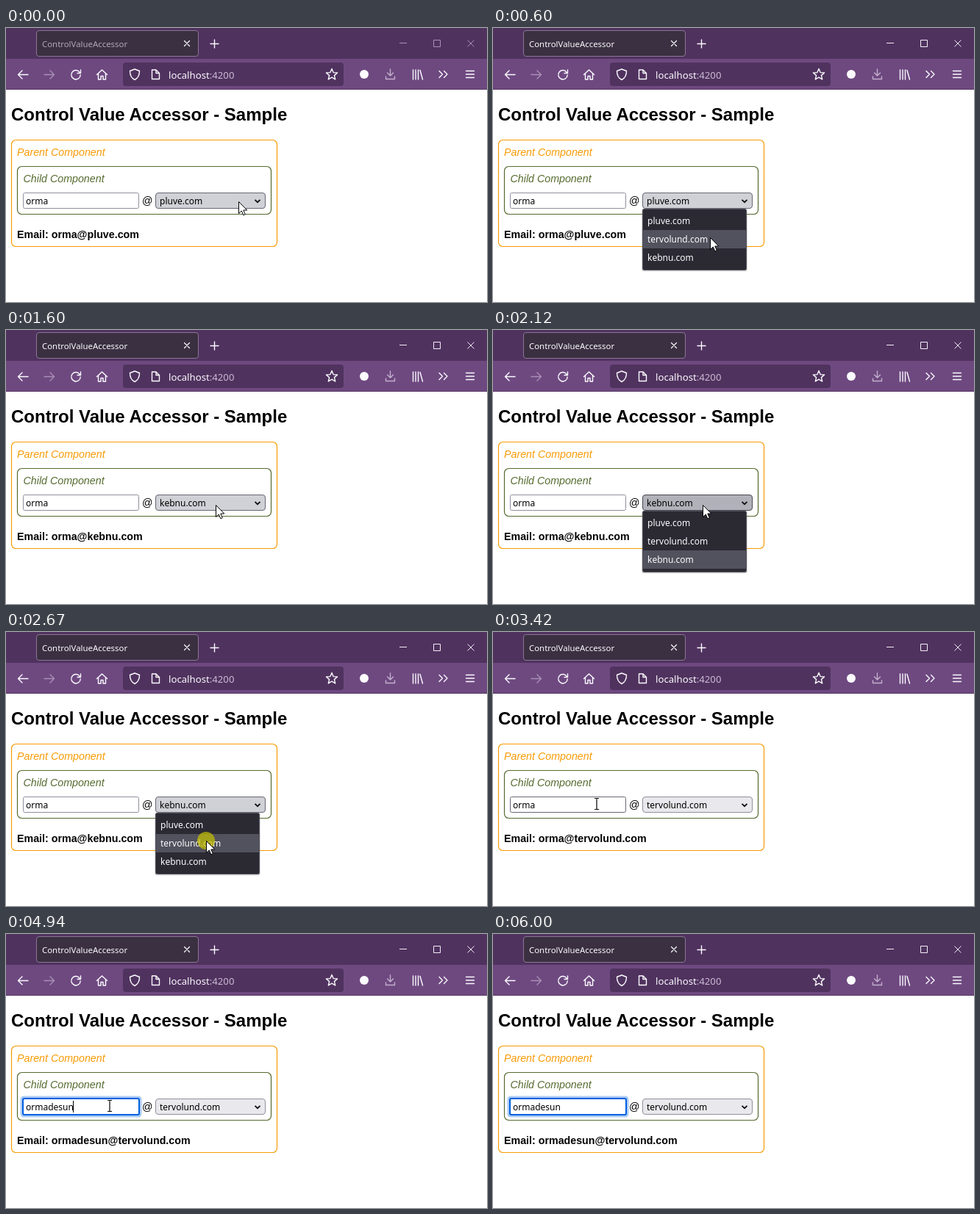
An HTML page that plays this animation: 654x373 px, repeating every 6.4 s.

```html
<!DOCTYPE html>
<html lang="en">
<head>
<meta charset="utf-8">
<title>Form demo</title>
<style>
  html, body { margin: 0; width: 100%; height: 100%; overflow: hidden; background: #fff; }
  svg { display: block; width: 654px; height: 373px; }
  text { white-space: pre; }
  .ui { font-family: "Noto Sans", "Open Sans", sans-serif; font-size: 12px; }
  .page { font-family: "Liberation Sans", Arial, sans-serif; font-size: 14.25px; }
  .icon { fill: none; stroke: #fbfbfe; stroke-width: 1.4; stroke-linecap: round; stroke-linejoin: round; }
  .dim { stroke: #a88fb5; }
</style>
</head>
<body>
<svg viewBox="0 0 654 373">
  <rect width="654" height="373" fill="#fff"/>

  <!-- browser window -->
  <rect width="654" height="42" fill="#50325f"/>
  <rect y="42" width="654" height="42" fill="#6e4980"/>
  <rect y="83" width="654" height="1" fill="#583a67"/>
  <rect x="41.5" y="3.5" width="220" height="35" rx="3.5" fill="#3b3041" stroke="#8b7697"/>
  <text id="tabTitle" class="ui" x="49" y="26" style="font-size:11.4px">ControlValueAccessor</text>
  <rect x="159" y="47" width="300" height="32" rx="4" fill="#50325f"/>
  <text class="ui" x="221" y="69" fill="#fbfbfe" style="font-size:13.2px">localhost<tspan fill="#c9bad2">:4200</tspan></text>
  <g class="icon">
    <path d="M242.5 17.5l7 7m0-7l-7 7" stroke-width="1.2"/>
    <path d="M278 21.5h11M283.5 16v11"/>
    <path d="M30 63.5H16.5m5.5-5.5l-5.5 5.5 5.5 5.500"/>
    <path class="dim" d="M52 63.500h13.500m-5.500-5.500l5.500 5.500-5.500 5.500"/>
    <path d="M100.300 60.500a6.200 6.200 0 1 0 .9 3.500M101.500 57v4.500H97"/>
    <path d="M123.500 63.500l7-6.500 7 6.500M125.500 62v8h3.500v-4.500h3V70h3.500v-8"/>
    <path d="M175 56l6.500 2.500c0 6-1.500 9.500-6.500 12-5-2.500-6.500-6-6.500-12z"/>
    <path d="M198.500 57h5.500l4.500 4.500v8h-10zM204 57v4.500h4.500"/>
    <path id="star"/>
    <path d="M522.500 56v9m-4-4l4 4 4-4M516.500 66v3.500h12V66" stroke="#c3afcd"/>
    <path d="M553.500 57v13M557 57v13M560.500 57v13M563 57.500l3.500 12.500"/>
    <path d="M589 58.500l4.500 4.500-4.500 4.500M595.500 58.500l4.500 4.500-4.500 4.500"/>
    <path d="M625.500 58.500h11M625.500 63h11M625.500 67.500h11"/>
  </g>
  <circle cx="487" cy="63" r="6" fill="#fbfbfe"/>
  <path id="winButtons" fill="none" d="M535 20.500h10M581.500 16.500h9v9h-9zM627.500 16.500l9 9m0-9l-9 9"/>

  <!-- page -->
  <g class="page">
    <text x="7" y="126" font-weight="bold" style="font-size:24px">Control Value Accessor - Sample</text>
    <rect x="7.500" y="152.500" width="361" height="145" rx="6" fill="none" stroke="#f89b06" stroke-width="1.200"/>
    <text x="15" y="174" font-style="italic" fill="#f89b06">Parent Component</text>
    <rect x="15.500" y="188.500" width="345" height="65" rx="6" fill="none" stroke="#556b2f" stroke-width="1.200"/>
    <text x="23.500" y="210" font-style="italic" fill="#556b2f">Child Component</text>
    <text x="185" y="240">@</text>
    <text id="email" x="15" y="286" font-weight="bold"></text>
  </g>

  <rect id="halo" x="19.500" y="220.500" width="165" height="29" rx="4.500" fill="#0060df" fill-opacity=".32"/>
  <rect id="field" rx="2" fill="#fff"/>
  <text id="user" class="ui" x="27" y="240"></text>
  <rect id="caret" y="227" width="1" height="16"/>

  <rect id="select" x="203.500" y="224.500" width="149" height="21" rx="3.500"/>
  <text id="domain" class="ui" x="209" y="240"></text>
  <path d="M338.500 233.800l3.500 3.400 3.500-3.400" fill="none" stroke="#111" stroke-width="1.800"/>

  <g id="list">
    <rect x="202" y="246" width="144" height="85.500" rx="3" fill="#000" opacity=".15"/>
    <rect x="203.500" y="246.500" width="141" height="83" rx="2" fill="#2b2a33" stroke="#55545e"/>
    <rect id="hover" x="204" width="140" height="25" fill="#52525e"/>
    <g id="options" class="ui" fill="#fbfbfe"></g>
  </g>

  <circle id="ring" r="12" fill="#c8c300" fill-opacity=".7"/>
  <g id="pointer">
    <path id="arrow" d="M.5 .5V16.500L4.300 13 6.800 18.800 9.300 17.700 6.800 12H11.800Z" fill="#fff" stroke="#000"/>
    <path id="beam" d="M-3 -7.500h2.500l.5.500.5-.500H3M0 -7V7M-3 7.500h2.500L0 7l.5.500H3" fill="none" stroke="#000" stroke-width="1.200"/>
  </g>
</svg>
<script>
const $ = id => document.getElementById(id);
const LOOP = 6400;
const ROW_TOP = 250, ROW_HEIGHT = 25;
const domains = ["pluve.com", "tervolund.com", "kebnu.com"];
const firstName = "orma", fullName = "ormadesun";
const keyTimes = [4350, 4480, 4610, 4740, 4940];

const linear = p => p;
const easeOut = p => 1 - (1 - p) ** 2.2;
const smooth = p => p * p * (3 - 2 * p);

const home = [316, 236];
const moves = [
  { start: 470, end: 920, steps: 8, to: [283, 312], ease: easeOut },
  { start: 1330, end: 1600, steps: 5, to: [285, 238], ease: smooth },
  { start: 2130, end: 2470, steps: 6, to: [272, 284], ease: easeOut },
  { start: 2940, end: 3420, steps: 8, to: [141, 234], ease: smooth },
  { start: 5730, end: 5930, steps: 4, to: [448, 343], ease: linear },
];

// each span is [from, until)
const presses = [[200, 270], [1120, 1190], [1930, 2000], [2670, 2740], [3620, 3680]];
const listOpen = [[270, 1190], [2000, 2740]];
const selectHeld = [[200, 470], [1930, 2130]];
const caretOn = [[3620, 4150], [4350, 5200], [5730, 6000]];

const within = (spans, t) => spans.some(([a, b]) => t >= a && t < b);
const inBox = ([x, y], left, top, right, bottom) => x >= left && x <= right && y >= top && y <= bottom;
const show = (id, on) => $(id).setAttribute("visibility", on ? "inherit" : "hidden");

function set(id, attrs) {
  for (const name in attrs) $(id).setAttribute(name, attrs[name]);
}

function setText(id, value) {
  if ($(id).textContent !== value) $(id).textContent = value;
}

function pointerAt(t) {
  let pos = home;
  for (const { start, end, steps, to, ease } of moves) {
    if (t < start) break;
    const step = Math.floor((t - start) / (end - start) * (steps - 1) + 0.01) + 1;
    const p = ease(Math.min(1, step / steps));
    pos = pos.map((v, i) => Math.round(v + (to[i] - v) * p));
  }
  return pos;
}

function render(t) {
  const pos = pointerAt(t);
  const open = within(listOpen, t);
  const chosen = t < 1190 ? 0 : t < 2740 ? 2 : 1;
  const user = fullName.slice(0, firstName.length + keyTimes.filter(k => t >= k).length);

  const active = t >= 200;
  set("tabTitle", { fill: active ? "#fbfbfe" : "#b0a6b5" });
  set("winButtons", { stroke: active ? "#f4eff7" : "#a994b5" });

  const overField = inBox(pos, 23, 224, 181, 246);
  const focused = t >= 3620;
  show("halo", focused);
  set("field", focused
    ? { x: 23, y: 224, width: 158, height: 22, stroke: "#0060df", "stroke-width": 2 }
    : { x: 23.5, y: 224.5, width: 157, height: 21, stroke: overField ? "#676774" : "#8f8f9d", "stroke-width": 1 });
  setText("user", user);
  setText("domain", domains[chosen]);
  setText("email", `Email: ${user}@${domains[chosen]}`);
  set("caret", { x: Math.floor(27 + $("user").getComputedTextLength()) });
  show("caret", within(caretOn, t));

  const [fill, stroke] = within(selectHeld, t) ? ["#b1b1b9", "#484851"]
    : open || inBox(pos, 203, 224, 353, 246) ? ["#d0d0d7", "#676774"]
    : ["#e9e9ed", "#8f8f9d"];
  set("select", { fill, stroke });

  const row = pos[1] < ROW_TOP ? chosen : Math.min(2, Math.floor((pos[1] - ROW_TOP) / ROW_HEIGHT));
  set("hover", { y: ROW_TOP + row * ROW_HEIGHT });
  show("list", open);

  set("ring", { cx: pos[0], cy: pos[1] });
  show("ring", within(presses, t));
  set("pointer", { transform: `translate(${pos})` });
  show("pointer", t < 6000);
  show("arrow", !overField);
  show("beam", overField);
}

domains.forEach((name, i) => {
  const label = document.createElementNS("http://www.w3.org/2000/svg", "text");
  label.setAttribute("x", 210);
  label.setAttribute("y", ROW_TOP + 17 + i * ROW_HEIGHT);
  label.textContent = name;
  $("options").append(label);
});

const starPoints = Array.from({ length: 10 }, (_, i) => {
  const r = i % 2 ? 3.6 : 8, a = i * Math.PI / 5;
  return `${(443 + r * Math.sin(a)).toFixed(1)} ${(63.5 - r * Math.cos(a)).toFixed(1)}`;
});
set("star", { d: `M${starPoints.join("L")}Z` });

const begin = performance.now();
function frame() {
  render((performance.now() - begin) % LOOP);
  requestAnimationFrame(frame);
}
frame();
</script>
</body>
</html>
```
